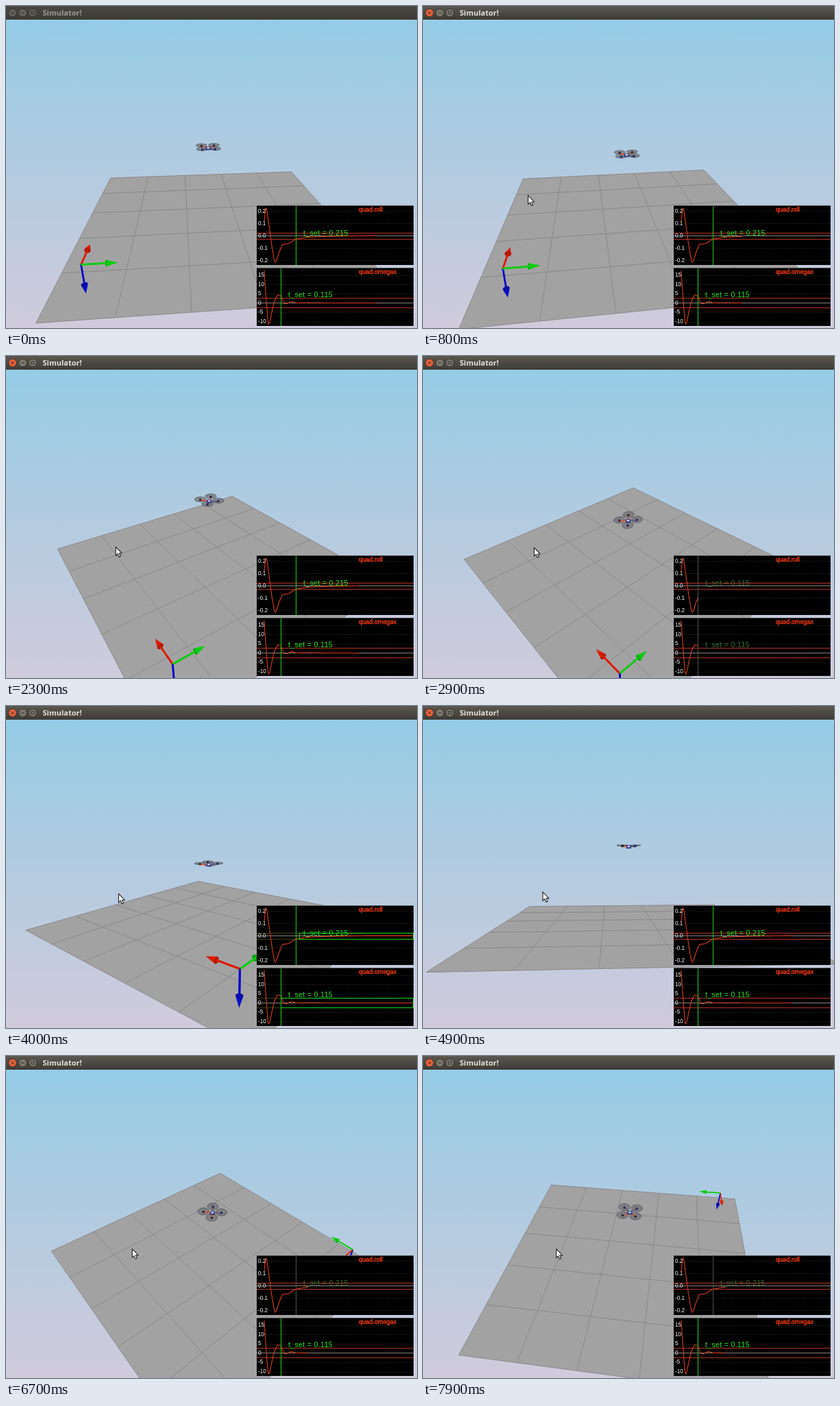
These frames come from a looping animation (600 by 470 pixels, 8 s). An HTML page with a canvas:

```html
<!DOCTYPE html>
<html lang="en">
<head>
<meta charset="utf-8">
<title>Simulator!</title>
<style>
  html, body { margin: 0; width: 600px; height: 470px; overflow: hidden; }
  canvas { display: block; }
</style>
</head>
<body>
<canvas id="stage" width="600" height="470"></canvas>
<script>
const ctx = document.getElementById('stage').getContext('2d');
const LOOP = 8000, TICK = 100;
const FOCAL = 480, DIST = 6.4, CX = 300, CY = 245;
const SANS = '"Liberation Sans", Arial, sans-serif';

// Camera keys: [ms, yaw, pitch] in degrees
const CAMERA = [
  [0, 5.3, 21.3], [700, 5.3, 21.3], [1600, 25.7, 25], [2900, 42.7, 33],
  [3200, 46, 33.8], [4000, 51.6, 12.3], [4900, 93.4, 3.1],
  [6300, 122, 32], [6700, 130.8, 40], [7900, 172.5, 41], [8000, 174, 41]
];
const FOCUS_AT = 700;

// Start of each simulated flight in ms; one flight second lasts RUN ms
const STARTS = [-880, 320, 1555, 2760, 4030, 5210, 6350, 7550];
const RUN = 1200;

const HEIGHT = [[0, 0], [.04, .01], [.117, .08], [.29, .29], [.5, .48], [.73, .53], [1, .2]];

const PLOTS = [
  { name: 'quad.roll', top: 291, bottom: 378, hi: 295, lo: 374, settle: .215, band: .026, boxX: 428, labelY: 335,
    data: [[.008, .12], [.02, .225], [.0375, .098], [.06, -.1], [.08, -.215], [.105, -.135], [.13, -.07],
           [.16, -.065], [.215, -.028], [.29, -.012], [.45, -.004], [.7, 0], [1, 0]],
    step: range => range > .25 ? .1 : .05 },
  { name: 'quad.omegax', top: 382, bottom: 467, hi: 386, lo: 464, settle: .115, band: 2.6, boxX: 401, labelY: 425,
    data: [[.008, 17.5], [.02, 3], [.037, -11.3], [.06, -4], [.075, 1], [.1, 4.3], [.115, 3.7],
           [.14, -.4], [.155, -.3], [.185, .7], [.22, 0], [.3, .1], [.4, 0], [1, 0]],
    step: () => 5 }
];
const PLOT_X = 366, PLOT_W = 229;
const timeX = t => 375.1 + 225 * t;

let cam;

function lerpKeys(keys, t, col = 1) {
  let i = 1;
  while (i < keys.length - 1 && keys[i][0] < t) i++;
  const a = keys[i - 1], b = keys[i];
  const k = Math.min(1, Math.max(0, (t - a[0]) / (b[0] - a[0])));
  return a[col] + (b[col] - a[col]) * k;
}

// Cubic through the points, flat at each peak and trough
function curve(pts, t) {
  let i = 0;
  while (i < pts.length - 2 && pts[i + 1][0] < t) i++;
  const slope = j => (pts[j + 1][1] - pts[j][1]) / (pts[j + 1][0] - pts[j][0]);
  const tangent = j => {
    if (j === 0) return slope(0);
    if (j === pts.length - 1) return 0;
    const p = slope(j - 1), q = slope(j);
    return p * q <= 0 ? 0 : 2 * p * q / (p + q);
  };
  const [t0, v0] = pts[i], [t1, v1] = pts[i + 1];
  const h = t1 - t0, s = Math.min(1, Math.max(0, (t - t0) / h));
  const s2 = s * s, s3 = s2 * s;
  return v0 * (2 * s3 - 3 * s2 + 1) + v1 * (3 * s2 - 2 * s3) +
    h * (tangent(i) * (s3 - 2 * s2 + s) + tangent(i + 1) * (s3 - s2));
}

function setCamera(yaw, pitch) {
  const r = Math.PI / 180;
  cam = { cy: Math.cos(yaw * r), sy: Math.sin(yaw * r), cp: Math.cos(pitch * r), sp: Math.sin(pitch * r) };
}

// World point (x, y, up), measured from the point the camera orbits
function project([x, y, z]) {
  const a = x * cam.cy + y * cam.sy, b = y * cam.cy - x * cam.sy;
  const depth = DIST + a * cam.cp - z * cam.sp;
  const k = FOCAL / depth;
  return { x: CX + b * k, y: CY - (a * cam.sp + z * cam.cp) * k, k, depth };
}

function path(points, close) {
  ctx.beginPath();
  for (const p of points) {
    const q = project(p);
    ctx.lineTo(q.x, q.y);
  }
  if (close) ctx.closePath();
}

function line(p, q, color, width) {
  path([p, q]);
  ctx.strokeStyle = color;
  ctx.lineWidth = width;
  ctx.stroke();
}

function segment(x0, y0, x1, y1, color) {
  ctx.beginPath();
  ctx.moveTo(x0, y0);
  ctx.lineTo(x1, y1);
  ctx.strokeStyle = color;
  ctx.lineWidth = 1;
  ctx.stroke();
}

function drawSky() {
  const g = ctx.createLinearGradient(0, 20, 0, 470);
  g.addColorStop(0, '#95cce6');
  g.addColorStop(.45, '#b0cbe0');
  g.addColorStop(1, '#d0cbdc');
  ctx.fillStyle = g;
  ctx.fillRect(0, 0, 600, 470);
}

function drawFloor() {
  path([[-2.5, -2.5, -1], [2.5, -2.5, -1], [2.5, 2.5, -1], [-2.5, 2.5, -1]], true);
  ctx.fillStyle = '#a3a2a3';
  ctx.fill();
  for (let i = 0; i <= 5; i++) {
    const v = i - 2.5;
    line([v, -2.5, -1], [v, 2.5, -1], '#8b8a8b', 1);
    line([-2.5, v, -1], [2.5, v, -1], '#8b8a8b', 1);
  }
}

function drawArrow({ dir, color, shade }) {
  const at = (d, i = 0, j = 0) => {
    const axis = dir.findIndex(v => v);
    const p = [-2, -2, -.5];
    p[axis] += dir[axis] * d;
    p[(axis + 1) % 3] += i;
    p[(axis + 2) % 3] += j;
    return p;
  };
  const ring = n => at(.34, .045 * Math.cos(n * Math.PI / 6), .045 * Math.sin(n * Math.PI / 6));
  line(at(0), at(.35), color, .024 * project(at(.2)).k);
  ctx.fillStyle = color;
  for (let n = 0; n < 12; n++) {
    path([at(.5), ring(n), ring(n + 1)], true);
    ctx.fill();
  }
  if (project(at(.5)).depth > project(at(.34)).depth) {
    path(Array.from({ length: 12 }, (_, n) => ring(n)), true);
    ctx.fillStyle = shade;
    ctx.fill();
    line(at(0), at(.35), color, .024 * project(at(.2)).k);
  }
}

function drawAxes() {
  const arrows = [
    { dir: [1, 0, 0], color: '#dc1c04', shade: '#b01804' },
    { dir: [0, 1, 0], color: '#10cc14', shade: '#0ca010' },
    { dir: [0, 0, -1], color: '#0a0cc8', shade: '#080a98' }
  ];
  const depth = a => project([-2 + a.dir[0], -2 + a.dir[1], -.5 + a.dir[2]]).depth;
  arrows.sort((a, b) => depth(b) - depth(a)).forEach(drawArrow);
}

function drawQuad(t) {
  const z = lerpKeys(HEIGHT, t), shift = -.085 * t;
  const roll = curve(PLOTS[0].data, t);
  const c = Math.cos(roll), s = Math.sin(roll);
  const place = (x, y, up) => [x, shift + y * c + up * s, z - y * s + up * c];
  const R = .12;
  const rotors = [[R, -R], [R, R], [-R, -R], [-R, R]]
    .sort((p, q) => project(place(q[0], q[1], 0)).depth - project(place(p[0], p[1], 0)).depth);
  for (const [x, y] of rotors) {
    path(Array.from({ length: 24 }, (_, n) =>
      place(x + .105 * Math.cos(n * Math.PI / 12), y + .105 * Math.sin(n * Math.PI / 12), .02)), true);
    ctx.fillStyle = 'rgba(112,112,118,.72)';
    ctx.fill();
    ctx.strokeStyle = '#5c5c60';
    ctx.lineWidth = .9;
    ctx.stroke();
  }
  for (const [x, y] of rotors) {
    line(place(0, 0, 0), place(x, y, 0), x > 0 ? '#e0502c' : '#5a5c78', 1.5);
    const m = project(place(x, y, .01));
    ctx.fillStyle = x > 0 ? '#24222c' : '#1c2060';
    ctx.fillRect(m.x - 1.5, m.y - 1.3, 3, 2.8);
  }
  const b = project(place(0, 0, 0));
  ctx.fillStyle = '#2c3480';
  ctx.fillRect(b.x - 3.5, b.y - 2, 7, 5);
  ctx.fillStyle = '#c4cce4';
  ctx.fillRect(b.x - 2, b.y - 1.2, 4, 2.4);
}

function text(str, x, y, size, color, spacing = 0) {
  ctx.font = `${size}px ${SANS}`;
  ctx.letterSpacing = spacing + 'px';
  ctx.fillStyle = color;
  ctx.fillText(str, x, y);
  ctx.letterSpacing = '0px';
}

function drawPlot(plot, t) {
  const samples = [];
  for (let s = .008; s < t; s += .002) samples.push([s, curve(plot.data, s)]);
  samples.push([t, curve(plot.data, t)]);
  const values = samples.map(p => p[1]);
  const max = Math.max(...values), min = Math.min(...values);
  const toY = v => plot.hi + (max - v) / (max - min) * (plot.lo - plot.hi);
  const snap = v => Math.round(toY(v)) + .5;
  const right = PLOT_X + PLOT_W, done = t >= .97;

  ctx.save();
  ctx.beginPath();
  ctx.rect(PLOT_X, plot.top, PLOT_W, plot.bottom - plot.top);
  ctx.clip();
  ctx.fillStyle = '#000';
  ctx.fillRect(PLOT_X, plot.top, PLOT_W, plot.bottom - plot.top);

  const step = plot.step(max - min);
  const digits = step >= 1 ? 0 : step < .1 ? 2 : 1;
  const ticks = [];
  for (let n = Math.ceil(min / step); n <= max / step; n++) {
    if (toY(n * step) < plot.lo - 2) ticks.push(n * step);
  }
  ctx.setLineDash([1, 2]);
  for (const v of ticks) segment(PLOT_X, snap(v), right, snap(v), '#303030');
  ctx.setLineDash([]);

  segment(PLOT_X, snap(0), right, snap(0), '#8c8078');
  const bandColor = done ? '#3c3c18' : '#b03424';
  for (const v of [plot.band, -plot.band]) segment(PLOT_X, snap(v), right, snap(v), bandColor);

  ctx.beginPath();
  for (const [s, v] of samples) ctx.lineTo(timeX(s), toY(v));
  ctx.strokeStyle = '#d83c20';
  ctx.lineWidth = 1.1;
  ctx.stroke();

  const set = Math.min(t, plot.settle), settled = t - plot.settle > .1;
  const x = Math.round(timeX(set));
  segment(x + .5, plot.top, x + .5, plot.bottom, settled ? '#1ccc1c' : '#4a564a');
  const shown = (Math.floor(set * 200 + 1e-6) / 200).toFixed(3);
  text('t_set = ' + shown, x + 11, plot.labelY, 10.6, settled ? '#1ee61e' : '#357035', .32);

  if (done) {
    ctx.strokeStyle = '#1cd81c';
    ctx.strokeRect(plot.boxX + .5, snap(plot.band), right - plot.boxX - 1, snap(-plot.band) - snap(plot.band));
  }

  ctx.textBaseline = 'middle';
  for (const v of ticks) text(v.toFixed(digits).replace(/^-(?=0(\.0)?$)/, ''), 368, toY(v), 8.2, '#f4f4f4');
  ctx.textBaseline = 'alphabetic';
  text(plot.name, 515, plot.top + 9, 9.1, '#ff3c14');
  ctx.strokeStyle = '#ff3c14';
  ctx.lineWidth = .35;
  ctx.strokeText(plot.name, 515, plot.top + 9);
  ctx.restore();

  segment(PLOT_X, plot.top + .5, right, plot.top + .5, '#4c4c4c');
}

function drawTitleBar(focused) {
  const g = ctx.createLinearGradient(0, 0, 0, 20);
  g.addColorStop(0, focused ? '#5c584f' : '#4a4842');
  g.addColorStop(1, '#3d3b37');
  ctx.fillStyle = g;
  ctx.fillRect(0, 0, 600, 20);
  [9.5, 24.5, 39].forEach((x, i) => {
    ctx.beginPath();
    ctx.arc(x, 10, 5.8, 0, 7);
    ctx.fillStyle = !focused ? '#64615a' : i ? '#7b776d' : '#ec6038';
    ctx.fill();
    ctx.strokeStyle = '#33312d';
    ctx.lineWidth = .8;
    ctx.stroke();
    ctx.beginPath();
    if (i === 0) {
      ctx.moveTo(x - 2, 8); ctx.lineTo(x + 2, 12);
      ctx.moveTo(x + 2, 8); ctx.lineTo(x - 2, 12);
    } else if (i === 1) {
      ctx.moveTo(x - 2.5, 10); ctx.lineTo(x + 2.5, 10);
    } else {
      ctx.rect(x - 2.2, 8, 4.4, 4);
    }
    ctx.lineWidth = 1;
    ctx.stroke();
  });
  ctx.font = '700 11px "Open Sans", "Noto Sans", sans-serif';
  ctx.fillStyle = focused ? '#e4e0d8' : '#9b978d';
  ctx.fillText('Simulator!', 53.5, 14);
}

function drawCursor(x, y) {
  const shape = [[0, 0], [0, 12.5], [2.8, 10], [4.8, 14.5], [7, 13.5], [5, 9.2], [8.8, 9]];
  ctx.beginPath();
  for (const [dx, dy] of shape) ctx.lineTo(x + dx, y + dy);
  ctx.closePath();
  ctx.fillStyle = '#fff';
  ctx.fill();
  ctx.strokeStyle = '#222';
  ctx.lineWidth = 1.1;
  ctx.stroke();
}

function draw(ms) {
  const yaw = lerpKeys(CAMERA, ms, 1), pitch = lerpKeys(CAMERA, ms, 2);
  const start = STARTS.filter(s => s <= ms).pop();
  const t = Math.min(1, (ms - start) / RUN);
  const focused = ms >= FOCUS_AT;
  setCamera(yaw, pitch);
  drawSky();
  drawFloor();
  drawAxes();
  drawQuad(t);
  for (const plot of PLOTS) drawPlot(plot, t);
  drawTitleBar(focused);
  if (focused) drawCursor(158 + (yaw - 25.7) * .25, 273 + (pitch - 8) * .27);
}

const origin = performance.now();
function frame() {
  const ms = (performance.now() - origin) % LOOP;
  draw(Math.floor(ms / TICK) * TICK);
  requestAnimationFrame(frame);
}
frame();
</script>
</body>
</html>
```
